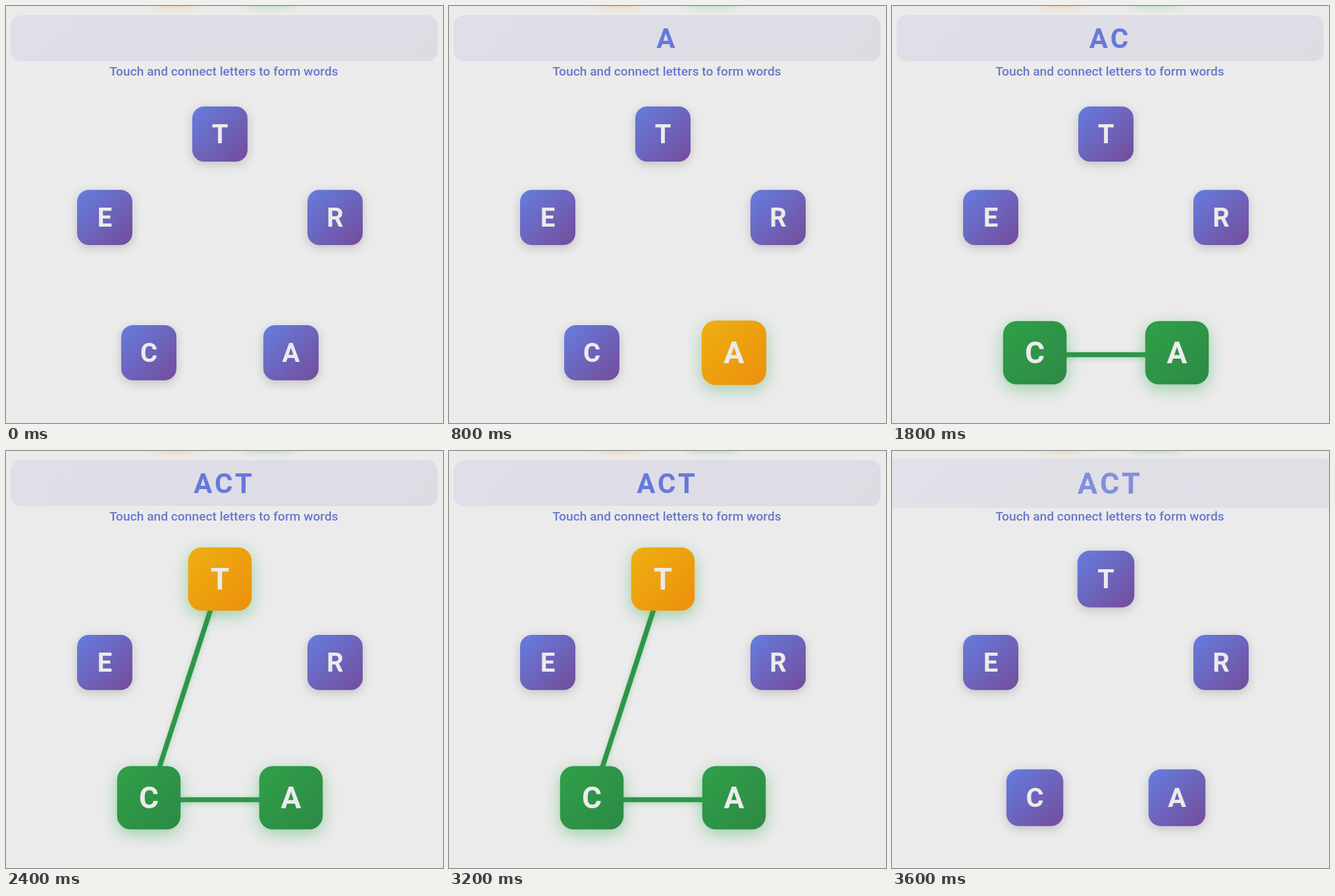
Recreate the animation shown at these times as an HTML page. Size 664x635 px, loop 3.8 s.

```html
<!DOCTYPE html>
<html lang="en">
<head>
<meta charset="utf-8">
<title>Word connect</title>
<style>
  html, body { margin: 0; width: 100%; height: 100%; overflow: hidden; background: #ebebeb; }
  body { position: relative; font-family: Roboto, sans-serif; }
  body > * { position: absolute; }
  .glow { top: -40px; height: 33px; border-radius: 16px; }
  #panel, .tile { display: flex; align-items: center; justify-content: center; font-weight: 700; }
  #panel {
    left: 7px; top: 14px; width: 649px; height: 70px; border-radius: 16px;
    background: linear-gradient(135deg, #dedfe9, #dedbe3);
    color: #6779da; font-size: 42px; letter-spacing: 4px;
  }
  #hint {
    left: 0; top: 88px; width: 662px; line-height: 24px; text-align: center;
    color: #6878cc; font-size: 19.2px; font-weight: 500; white-space: nowrap;
  }
  svg { left: 0; top: 0; filter: drop-shadow(0 2px 4px rgba(40, 167, 69, .3)); }
  line { stroke: #2d9549; stroke-width: 7.5; }
  .tile {
    width: 84px; height: 84px; border-radius: 18px; color: #ebebeb; font-size: 40px;
    background: linear-gradient(135deg, #657ddf, #744c9a);
    box-shadow: 0 4px 15px rgba(0, 0, 0, .18);
  }
  .current, .linked { box-shadow: 0 6px 20px rgba(40, 167, 69, .4); }
  .current { background: linear-gradient(135deg, #ecb010, #ee8f0c); }
  .linked { background: linear-gradient(135deg, #2fa049, #2d8945); }
</style>
</head>
<body>
<div class="glow" style="left:222px;width:70px;box-shadow:0 4px 15px rgba(255,152,0,.5)"></div>
<div class="glow" style="left:358px;width:84px;box-shadow:0 4px 15px rgba(40,167,69,.45)"></div>
<div id="panel"></div>
<div id="hint">Touch and connect letters to form words</div>
<svg width="664" height="635"></svg>
<script>
const LOOP = 3800, STEP = 200, RELEASE = 3400;
const panel = document.getElementById('panel');
const svg = document.querySelector('svg');

// letter, centre, time picked, time it turns from current to linked
const tiles = [
  ['T', 325, 195, 2400, RELEASE],
  ['R', 500, 322],
  ['A', 433, 528, 400, 1000],
  ['C', 217, 528, 1200, 1800],
  ['E', 150, 322]
].map(([letter, x, y, pick = Infinity, link]) => {
  const el = document.createElement('div');
  el.textContent = letter;
  el.style.left = x - 42 + 'px';
  el.style.top = y - 42 + 'px';
  document.body.append(el);
  return { letter, x, y, pick, link, el };
});

const path = tiles.filter(p => p.pick < LOOP).sort((a, b) => a.pick - b.pick);
const lines = path.slice(1).map((to, i) => {
  const from = path[i];
  const el = document.createElementNS('http://www.w3.org/2000/svg', 'line');
  const ends = { x1: from.x, y1: from.y + 3, x2: to.x, y2: to.y + 3 };
  for (const k in ends) el.setAttribute(k, ends[k]);
  svg.append(el);
  return { el, pick: to.pick };
});

function tileScale(p, t) {
  if (t < p.pick) return 1;
  if (t >= RELEASE) return t > RELEASE ? 1.03 : 1.13;
  const settle = p.link < RELEASE ? Math.max(0, 1 - (t - p.pick) / 600) : 0;
  return 1.15 + .08 * settle ** 1.4;
}

function draw(t) {
  const released = t >= RELEASE;
  for (const p of tiles) {
    const on = t >= p.pick && !released;
    p.el.className = 'tile' + (on ? (t < p.link ? ' current' : ' linked') : '');
    p.el.style.transform = `scale(${tileScale(p, t)})`;
  }
  for (const l of lines)
    l.el.style.display = t >= l.pick && !released ? '' : 'none';

  panel.textContent = path.filter(p => t >= p.pick).map(p => p.letter).join('');
  const swell = released ? (t - RELEASE + STEP) / (2 * STEP) : 0;
  panel.style.transform = `scale(${1 + .075 * swell})`;
  panel.style.opacity = 1 - .2 * swell;
}

function frame() {
  const t = performance.now() % LOOP;
  draw(Math.floor(t / STEP) * STEP);
  requestAnimationFrame(frame);
}
frame();
</script>
</body>
</html>
```
